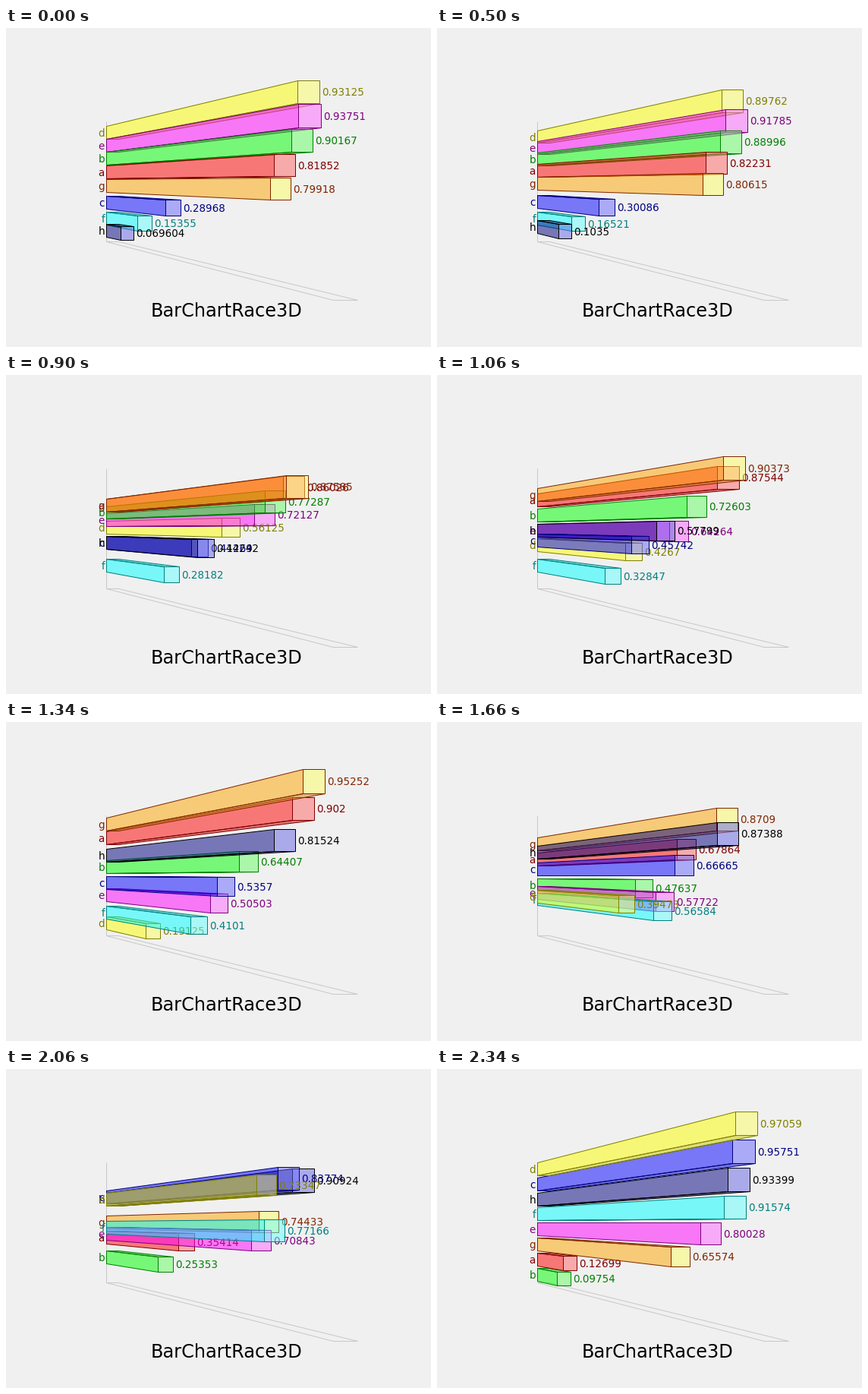
A matplotlib script that plays this animation: 560 by 420 pixels, repeating every 2.38 s.

```python
import numpy as np
import matplotlib.pyplot as plt
from matplotlib.animation import FuncAnimation
from matplotlib.colors import to_rgb
from matplotlib.patches import Polygon

W, H, DPI = 560, 420, 100
PX = 72 / DPI                 # one pixel in points
TICK, HOLD, STEPS = 20, 25, 24

# Seeded values: one row per stage, one column per bar
NAMES = "abcdefgh"
DATA = np.random.RandomState(5489).random_sample((len(NAMES), 3)).T
RANKS = np.argsort(np.argsort(-DATA, axis=1), axis=1)
PEAKS = DATA.max(axis=1)
COLORS = "red lime blue yellow magenta cyan orange navy".split()

# One-point perspective: the back wall is at depth 0, the leader's peak at 1
LEFT, DEPTH, WIDTH = 132, 260.7, 16
HORIZON, GROWTH = 202, 0.85
TOP, FLOOR, PITCH, BAR = 123, 281.2, 19.82, 16.9
FLOOR_DEPTH = 1.147


def project(side, y, depth):
    """Nearest pixel to a point of the scene."""
    scale = 1 + GROWTH * depth
    return np.round((LEFT + DEPTH * depth + side * WIDTH * scale,
                     HORIZON + (y - HORIZON) * scale))


def slab(y, depth):
    """Horizontal face at height y reaching out to depth."""
    return [project(0, y, 0), project(0, y, depth),
            project(1, y, depth), project(1, y, 0)]


fig = plt.figure(figsize=(W / 100, H / 100), dpi=DPI, facecolor="#f0f0f0")
ax = fig.add_axes([0, 0, 1, 1])
ax.set_xlim(-0.5, W - 0.5)
ax.set_ylim(H - 0.5, -0.5)
ax.axis("off")


def polygon(points, fill, edge, **style):
    return ax.add_patch(Polygon(points, fc=fill, ec=edge, lw=PX,
                                snap=False, **style))


def write(x, y, text, size, **style):
    return ax.text(x, y, text, fontsize=size * PX, va="baseline",
                   family="DejaVu Sans", **style)


GREY = "#c8c8c8"
polygon([(LEFT, TOP), (LEFT, round(FLOOR))], "none", GREY, zorder=0)
polygon(slab(FLOOR, FLOOR_DEPTH), "none", GREY, zorder=0)
write(290, 380, "BarChartRace3D", 24, ha="center", color="black")


class Bar:
    def __init__(self, name, color):
        color = np.array(to_rgb(color))
        edge = np.clip(color - 0.5, 0, 1)
        fills = color, color * 0.8, np.clip(color + 0.4, 0, 1)
        self.side, self.lid, self.front = [
            polygon([(0, 0)] * 4, (*f, 0.5), (*edge, 1)) for f in fills]
        self.label = write(129.5, 0, name, 13.5, ha="right", color=edge)
        self.value = write(0, 0, "", 13.5, ha="left", color=edge)
        self.parts = [self.side, self.lid, self.front, self.label, self.value]

    def place(self, value, rank, peak, layer):
        depth = value / peak
        top = TOP + PITCH * rank
        low = top + BAR
        a, b = project(0, top, depth), project(0, low, depth)
        c, d = project(1, low, depth), project(1, top, depth)
        self.side.set_xy([project(0, top, 0), a, b, project(0, low, 0)])
        self.front.set_xy([a, b, c, d])
        # only the lid facing the eye is seen
        self.lid.set_visible(top > HORIZON or low < HORIZON)
        self.lid.set_xy(slab(top if top > HORIZON else low, depth))
        self.label.set_y((top + low) / 2 + 5)
        self.value.set_position((c[0] + 2.6, (a[1] + b[1]) / 2 + 5))
        self.value.set_text(f"{value:.5g}")
        for i, part in enumerate(self.parts):
            part.set_zorder(1 + layer + i / 10)


bars = [Bar(n, c) for n, c in zip(NAMES, COLORS)]


def blend(rows, stage, t):
    return rows[stage] + (rows[stage + 1] - rows[stage]) * t


def draw(tick):
    step = 1 if tick < HOLD else 2 + (tick - HOLD) // 2
    stage = (step - 1) // STEPS
    t = step / STEPS - stage
    values, ranks = blend(DATA, stage, t), blend(RANKS, stage, t)
    peak = blend(PEAKS, stage, t)
    # bars heading for a higher place are painted later
    layers = len(NAMES) - 1 - RANKS[stage + 1]
    for bar, value, rank, layer in zip(bars, values, ranks, layers):
        bar.place(value, rank, peak, layer)
    return []


anim = FuncAnimation(fig, draw, frames=HOLD + 2 * (2 * STEPS - 1),
                     interval=TICK, repeat=True, repeat_delay=0, blit=False)
plt.show()
```
